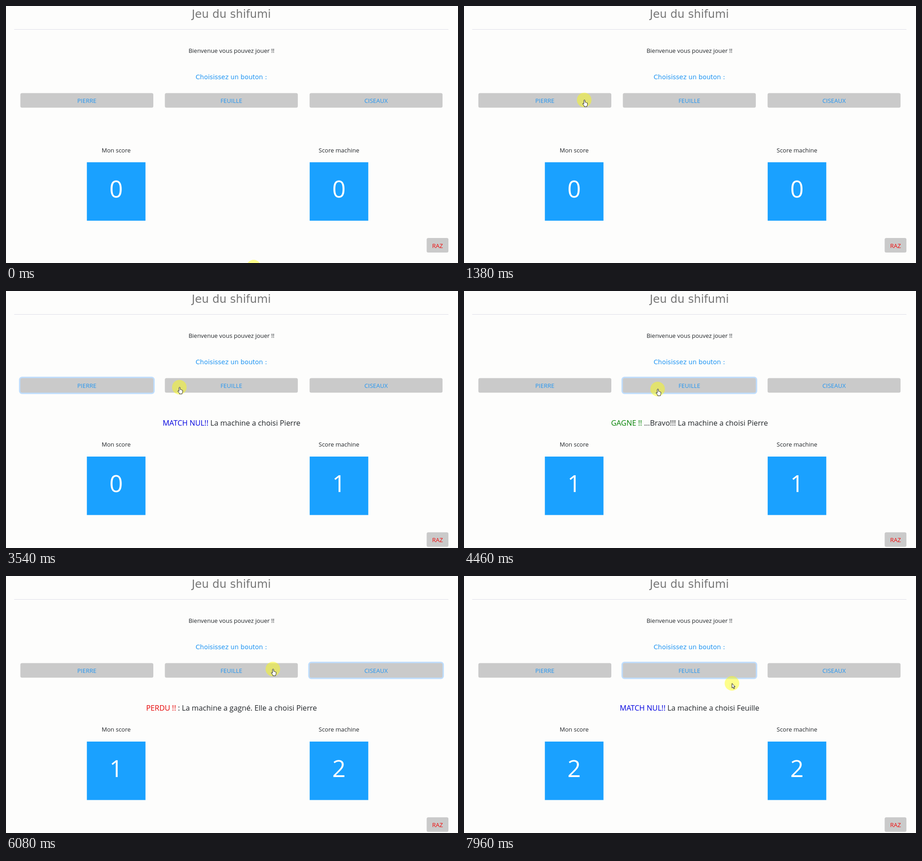
An HTML page for the animation above (8 s loop, 991 px wide and 565 px high).

```html
<!DOCTYPE html>
<html lang="fr">
<head>
<meta charset="utf-8">
<title>Jeu du shifumi</title>
<style>
  html, body { margin: 0; width: 100%; height: 100%; overflow: hidden; background: #fdfdfc; }
  svg { display: block; width: 100%; height: 100%; }
  text { font: 13px "Open Sans", "Noto Sans", sans-serif; fill: #212529; text-anchor: middle; white-space: pre; }
  .title { font: 24.4px "DejaVu Sans", sans-serif; fill: #777; }
  .prompt { font: 13.9px "DejaVu Sans", sans-serif; fill: #2196f3; }
  .label { fill: #2196f3; }
  .reset { fill: #f00a0a; }
  .message { font-size: 16.3px; }
  .digit { font-size: 51.5px; fill: #fff; }
  .button { fill: #cacaca; }
  .ring { fill: #007bff; }
  .score { fill: #1aa1ff; }
  .pointer path { fill: #fff; stroke: #222; stroke-width: 1; stroke-linejoin: round; }
</style>
</head>
<body>
<svg id="stage" viewBox="0 0 991 565" preserveAspectRatio="none"></svg>
<script>
const LOOP = 8000;
const FADE = 150;
const SHIFT = 20.5;
const stage = document.getElementById('stage');

function add(parent, tag, attrs = {}, content = '') {
  const el = document.createElementNS('http://www.w3.org/2000/svg', tag);
  set(el, attrs);
  el.textContent = content;
  return parent.appendChild(el);
}

function set(el, attrs) {
  for (const name in attrs) el.setAttribute(name, attrs[name]);
}

function addText(parent, x, y, content, style = '') {
  return add(parent, 'text', { x, y, class: style }, content);
}

// Static header
addText(stage, 494, 26, 'Jeu du shifumi', 'title');
add(stage, 'rect', { x: 18, y: 51, width: 952, height: 1, fill: '#dedee8' });
addText(stage, 494.3, 102.6, 'Bienvenue vous pouvez jouer !!');
addText(stage, 494, 160.5, 'Choisissez un bouton :', 'prompt');

// Choice buttons
const TOP = 191.5, HEIGHT = 32, WIDTH = 291.5;
const buttons = [['PIERRE', 31.5], ['FEUILLE', 348.3], ['CISEAUX', 665.6]].map(([name, x]) => {
  const ring = add(stage, 'rect', { class: 'ring' });
  add(stage, 'rect', { x, y: TOP, width: WIDTH, height: HEIGHT, rx: 3.5, class: 'button' });
  addText(stage, x + WIDTH / 2, 213.2, name, 'label');
  return { x, ring };
});

// Result line
const message = addText(stage, 494.4, 296, '', 'message');
const verdict = add(message, 'tspan');
const detail = add(message, 'tspan');

// Scores and reset, pushed down once a result is shown
const lower = add(stage, 'g');
const digits = [['Mon score', 177.3], ['Score machine', 665.8]].map(([name, x]) => {
  addText(lower, x + 64.2, 321.8, name);
  add(lower, 'rect', { x, y: 343.5, width: 128.5, height: 128.5, class: 'score' });
  return addText(lower, x + 64.2, 421, '0', 'digit');
});
add(lower, 'rect', { x: 922.3, y: 510, width: 47.7, height: 32, rx: 3.5, class: 'button' });
addText(lower, 946, 531.7, 'RAZ', 'reset');

// Pointer with its highlight
const pointer = add(stage, 'g', { class: 'pointer' });
add(pointer, 'circle', { r: 16, fill: '#ff0', 'fill-opacity': 0.45 });
const hand = add(pointer, 'path', {
  d: 'M-.7 9V1.4Q-.7 0 .6 0T1.9 1.4V5.2Q3.1 4.6 3.8 5.7Q5 5.1 5.6 6.3Q7 6 7.2 7.5V10Q7 12 6 13.2V14.8H.2V13.4L-3 9.4Q-3.8 7.8-2.4 7.6Q-1.5 7.7-.7 9Z'
});
const arrow = add(pointer, 'path', {
  d: 'M0 0V10.2L2.3 8.2L3.8 12L5.6 11.3L4 7.6H7Z'
});

const RESULTS = {
  lost: ['#e60000', 'PERDU !!', ' : La machine a gagné. Elle a choisi '],
  draw: ['#0000e0', 'MATCH NUL!!', ' La machine a choisi '],
  won: ['#008000', 'GAGNE !!', ' ...Bravo!!! La machine a choisi ']
};

const rounds = [
  { at: 1790, button: 0, result: 'lost', pick: 'Feuille', score: [0, 1] },
  { at: 3080, button: 0, result: 'draw', pick: 'Pierre', score: [0, 1] },
  { at: 3960, button: 1, result: 'won', pick: 'Pierre', score: [1, 1] },
  { at: 5250, button: 2, result: 'lost', pick: 'Pierre', score: [1, 2] },
  { at: 6330, button: 1, result: 'won', pick: 'Pierre', score: [2, 2] },
  { at: 7670, button: 1, result: 'draw', pick: 'Feuille', score: [2, 2] }
];

// Pointer path: time, x, y
const path = [
  [0, 543, 574], [80, 543, 574], [480, 452, 430], [880, 335, 275], [1380, 263.5, 206.5],
  [1540, 263, 208], [2080, 263, 208], [2350, 268, 243], [2670, 272, 212],
  [3260, 272, 212], [3540, 380, 211.5], [3750, 387, 213], [4360, 387, 213],
  [4460, 424, 215.5], [4620, 545, 225], [4920, 694, 207], [5460, 693.3, 207],
  [5520, 693, 207], [6000, 585, 203.5], [6080, 585, 204.5], [6710, 585, 204.5],
  [6910, 587, 242], [7170, 588, 196], [7959, 588, 196], [7960, 587.5, 236], [8000, 587.5, 236]
];

const slope = (i, axis) => (path[i + 1][axis] - path[i][axis]) / (path[i + 1][0] - path[i][0]);

function tangent(i, axis) {
  if (i === 0 || i === path.length - 1) return 0;
  const a = slope(i - 1, axis), b = slope(i, axis);
  return a * b > 0 ? 2 * a * b / (a + b) : 0;
}

// Monotone cubic through the path points
function along(t, axis) {
  let i = 0;
  while (i < path.length - 2 && path[i + 1][0] <= t) i++;
  const span = path[i + 1][0] - path[i][0];
  const u = (t - path[i][0]) / span, v = 1 - u;
  return path[i][axis] * v * v * (1 + 2 * u) + path[i + 1][axis] * u * u * (3 - 2 * u)
    + span * u * v * (tangent(i, axis) * v - tangent(i + 1, axis) * u);
}

const ease = u => 1 - (1 - u) ** 2;

// Ring strength of a button, fading at each change of focus
function focus(index, t) {
  let level = 0, had = false;
  for (const round of rounds) {
    if (t < round.at) break;
    const has = round.button === index;
    if (has !== had) {
      const u = ease(Math.min(1, (t - round.at) / FADE));
      level = has ? u : 1 - u;
    }
    had = has;
  }
  return level;
}

function render(t) {
  const round = rounds.filter(r => r.at <= t).pop();
  const [color, head, tail] = round ? RESULTS[round.result] : ['', '', ''];
  verdict.style.fill = color;
  verdict.textContent = head;
  detail.textContent = round ? tail + round.pick : '';
  digits.forEach((digit, i) => { digit.textContent = round ? round.score[i] : 0; });
  set(lower, { transform: `translate(0 ${round ? SHIFT : 0})` });

  buttons.forEach(({ x, ring }, i) => {
    const level = focus(i, t), grow = 3 * level;
    set(ring, {
      x: x - grow, y: TOP - grow, width: WIDTH + 2 * grow, height: HEIGHT + 2 * grow,
      rx: 3.5 + grow, 'fill-opacity': 0.25 * level
    });
  });

  const x = along(t, 1), y = along(t, 2);
  const over = y >= TOP && y <= TOP + HEIGHT && buttons.some(b => x >= b.x && x <= b.x + WIDTH);
  set(pointer, { transform: `translate(${x.toFixed(2)} ${y.toFixed(2)})` });
  set(hand, { visibility: over ? 'visible' : 'hidden' });
  set(arrow, { visibility: over ? 'hidden' : 'visible' });
}

const start = performance.now();
function tick() {
  render((performance.now() - start) % LOOP);
  requestAnimationFrame(tick);
}
tick();
</script>
</body>
</html>
```
